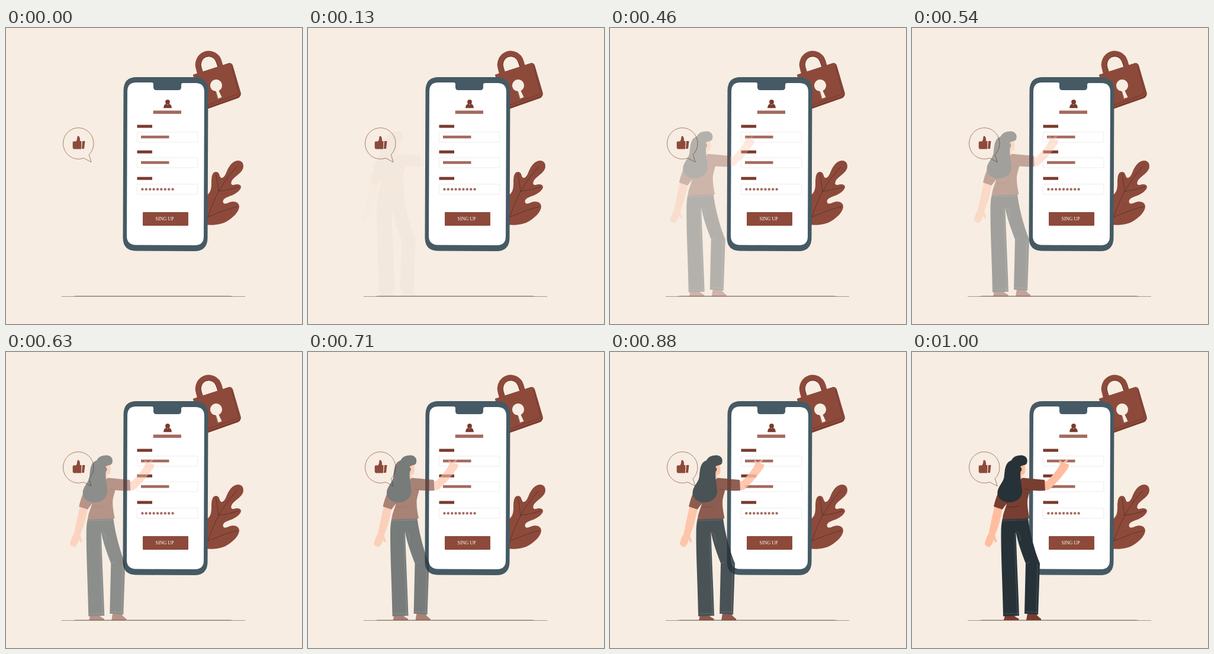
An HTML page for the animation above (1.04 s loop, 500 by 500 pixels).

```html
<!DOCTYPE html>
<html lang="en">
<head>
<meta charset="utf-8">
<title>Sign up</title>
<style>
html, body { margin: 0; width: 100%; height: 100%; overflow: hidden; background: #f7ede2; }
svg { display: block; width: 100vw; height: 100vh; }
.clay { fill: #8d4a3b; }
.dark { fill: #7a3b2e; }
.soft { fill: #a5695e; }
.cream { fill: #f7ede2; }
.skin { fill: #ffbd9f; }
.shirt { fill: #783e32; }
.navy { fill: #263238; }
.field { fill: #fff; stroke: #e9e8e8; stroke-width: .8; }
.vein { fill: none; stroke: #513029; stroke-width: .8; }
.seam { fill: none; stroke: #64717a; stroke-width: .5; }
.fold { fill: none; stroke: #51271f; stroke-width: .8; }
</style>
</head>
<body>
<svg viewBox="0 0 500 500">
  <!-- ground -->
  <path d="M94 453.5H404" stroke="#938579" stroke-width=".8"/>
  <path d="M112 453.6L118 452.6H379L385 453.6Z" fill="#7d756c"/>

  <!-- padlock -->
  <g>
    <path d="M328 78L325.500 68A17.800 18.500 0 0 1 359.500 56L363 68" fill="none" stroke="#8d4a3b" stroke-width="9.500"/>
    <path d="M332.500 74L330 67A13.200 14 0 0 1 355 57L358 65" fill="none" stroke="#642f25" stroke-width="1"/>
    <path class="dark" d="M316 79L376 59.500Q381 58 383 63L396.500 109Q398 115 392 118.500L341 136.500L330 132Z"/>
    <path class="clay" d="M316 79L376 59.500Q380 58.500 382 63L395 107Q396.500 113 391 116L341 133.500L330 130Z"/>
    <path d="M381 64L392 106Q393 111 388 113L341 130" fill="none" stroke="#6b3327" stroke-width=".8"/>
    <path class="cream" d="M350.500 106A10 10 0 1 1 359.500 106L364.500 117L357.500 119.500L354 107Z"/>
    <path d="M351 107L354.500 107.500L358 119" fill="none" stroke="#642f25" stroke-width=".8"/>
  </g>

  <!-- leaf -->
  <path class="clay" d="M335 332V284C346 281 347 271 347 262C347 252 348 243 354.500 243C361 243 360 250 363 253C367 254 370 250 373 242C378 230 385 224 392 224C400 224 402 231 400.500 237C397 246 387 250 382 257C379 262 380 266 385 265C391 263 396 264 397 268C397 274 388 280 381 283C372 286 367 288 366.500 293C367 298 371 297 376 295C385 291 394 294 394 302C393 312 382 321 374 326C365 332 350 334 335 332Z"/>
  <path class="vein" d="M340 322C350 293 360 267 390 234M359 275C357 262 356 253 354.500 246M358 275.500C372 275 384 271 394 268M341 319C358 313 374 305 391 302"/>

  <!-- phone -->
  <path fill="#455a64" d="M220.500 83H319.500Q341.500 84 341.500 106L340.500 355Q340 377 318 377L219 376.500Q197.500 376 197.500 354L198.500 105Q199 83 220.500 83Z"/>
  <path fill="#fff" d="M220 92H246Q249 92 249 95V100Q249 105 254 105H291Q296 105 296 100V96Q296 93 299 93H320Q335 93 335 108L334 352Q334 367 319 367L219 366.500Q204 366 204 351L205 107Q205 92 220 92Z"/>
  <circle class="dark" cx="273" cy="125" r="3.900"/>
  <path class="dark" d="M266 135.300Q266.500 128.500 271 128L273 130L275 128Q279.500 128.500 280 135.300Z"/>
  <rect class="soft" x="248.700" y="139.500" width="47.300" height="5.500"/>
  <g id="form"></g>
  <rect class="clay" x="231" y="311" width="77" height="23" rx="1.200"/>
  <text x="268" y="325" text-anchor="middle" font-family="'Liberation Serif', Times, serif" font-size="8" fill="#fff">SING UP</text>

  <!-- speech bubble -->
  <path d="M131 219.700A25.700 26.300 0 1 1 140.200 213.800L144 226.500Z" fill="none" stroke="#8d4a3b" stroke-width=".7"/>
  <path class="clay" d="M114 191.500H118.500Q120.500 188 120.500 183.500Q122 181.500 124 184Q125.500 187 125 191H127.500L127 204.500H115Q112.500 204 112.700 201V194Q112.500 192 114 191.500ZM129 191H133.500L132 204H128Z"/>

  <!-- woman -->
  <g id="woman" opacity="0">
    <path class="skin" d="M140 259L153 263C150 280 146 296 140.500 308C140 313 143 316 143.500 320L141 322L138 317C137 322 134 327 130 330L128 328L126 329L124.500 326L122.500 325C124 318 126 312 129.500 307C133 290 136 274 140 259Z"/>
    <path class="dark" d="M157 445H172Q176 449 180.500 450.500V453H155ZM195 441H209Q212 447 218 450.500V453H193Z"/>
    <path class="navy" d="M153 281L196 280C198 300 206 333 216 357L213 443.500L190 442L192 357C186 341 179 323 175.500 304C177 350 180 410 181 445.500L154 446.500C153 390 150 340 150.500 300Q151 288 153 281Z"/>
    <path class="seam" d="M152 285L195 283.500M174 305C174 360 177 410 178 445M176 304Q184 306 183 320M192 357L199 355M155 442L180 441.500M190 438.500L213 439.500M212 357L210 441"/>
    <path class="skin" d="M221 218L228 218C236 210 243 202 248.500 193L250 189L248.500 183.500L250.500 182.500L254 187L261.500 181.500L263.500 183L258.500 188L265 189.500L264.500 195C256 207 244 222 231 233L221 234Z"/>
    <path class="shirt" d="M183 213C190 212 206 215 224 216L225 234C215 235 206 234 199 233.500C198 240 195 246 195 254C195 265 197 273 198.500 281L153 283C153 273 158 265 160 256L152.500 266L138 261C141 248 145 237 151 228C160 218 172 214 183 213Z"/>
    <path class="fold" d="M161 261Q172 263 180 260M199 233L190 231M160 256L163 247"/>
    <path class="skin" d="M180 192L190.500 189L191.500 199C191.500 205 189.500 208 185.500 207.500L186 213Q183 217 180 214Z"/>
    <path class="navy" d="M168 183C171 176 180 173.500 188 175C195 177 196 184 193.500 189C190 192 185 191 183 194C186 197 186 200 183.500 202C182 212 185 222 186 234C187 246 176 254 165 254C152 254 143 246 144.500 236C146 226 153 222 155.500 212C157 202 156 187 168 183Z"/>
  </g>
</svg>
<script>
const FRAME = 1000 / 24, LOOP = 1040, FIRST = 2, LAST = 24, SLIDE = 36;
const woman = document.getElementById('woman');

const rect = (cls, x, y, w, h, rx = 0) =>
  `<rect class="${cls}" x="${x}" y="${y}" width="${w}" height="${h}" rx="${rx}"/>`;

const dots = y => Array.from({ length: 9 }, (_, i) =>
  `<circle class="soft" cx="${230.4 + 6.4 * i}" cy="${y}" r="2.2"/>`).join('');

document.getElementById('form').innerHTML = [163.6, 206.8, 251.6].map((y, i) =>
  rect('dark', 221.5, y, 25.5, 5) +
  rect('field', 221.3, y + 12.2, 102.5, 17, 1) +
  (i < 2 ? rect('soft', 228, y + 18.2, 47.5, 4.6) : dots(y + 20.8))).join('');

// Slide in at 24 fps while fading up.
function draw(now) {
  const frame = Math.floor((now % LOOP) / FRAME + 0.05);
  const p = Math.min(1, Math.max(0, (frame - FIRST) / (LAST - FIRST)));
  woman.setAttribute('transform', `translate(${-SLIDE * (1 - p)} 0)`);
  woman.setAttribute('opacity', p ** 1.3);
}

const start = performance.now();
function tick() {
  draw(performance.now() - start);
  requestAnimationFrame(tick);
}
tick();
</script>
</body>
</html>
```
